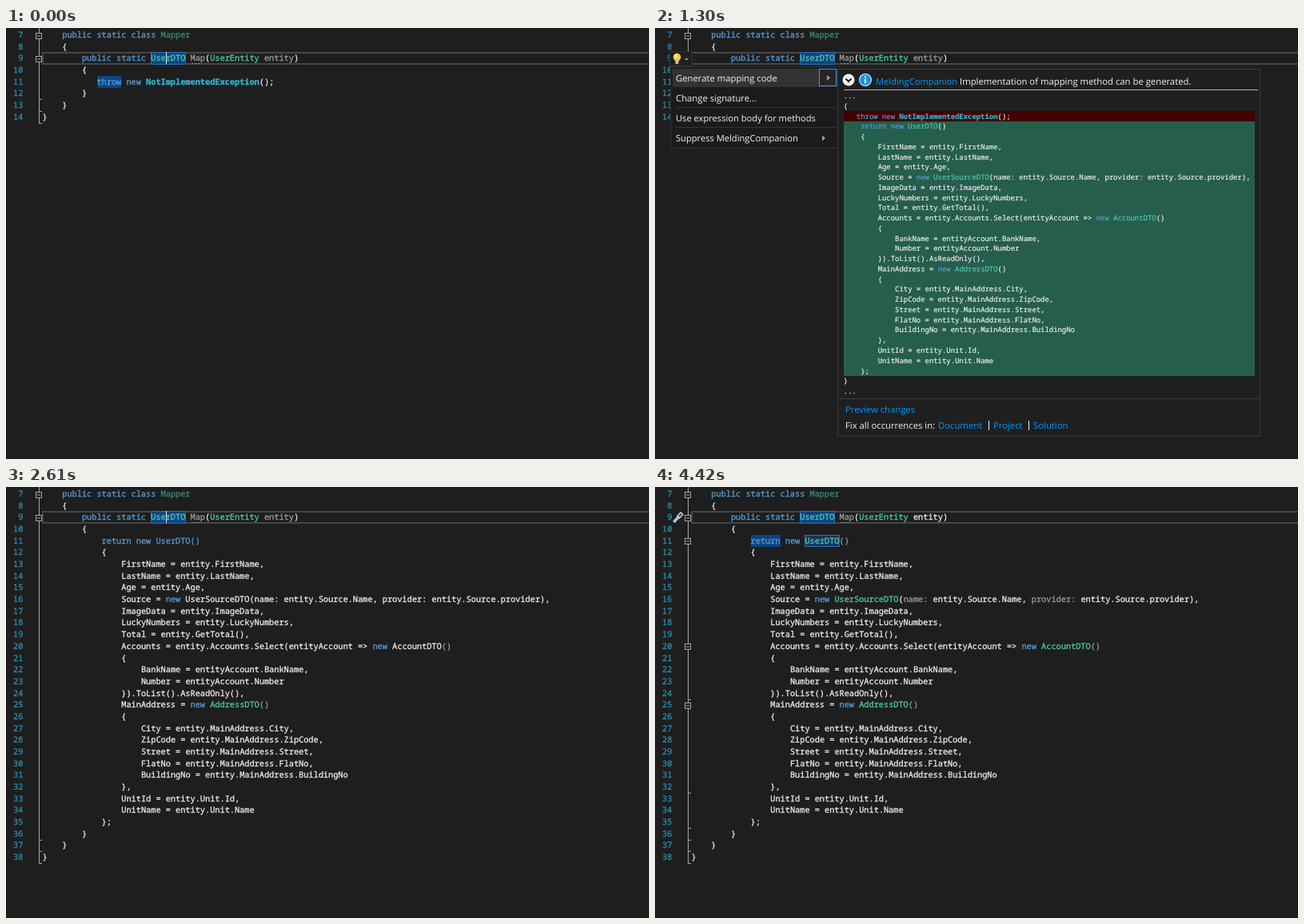
Animation of 804x540 px, one loop 4.78 s. Source, as an HTML page:

```html
<!DOCTYPE html>
<html lang="en">
<head>
<meta charset="utf-8">
<title>Mapping code</title>
<style>
html, body { margin: 0; width: 100%; height: 100%; overflow: hidden; background: #1e1e1e; }
svg { display: block; width: 804px; height: 540px; text-rendering: geometricPrecision; }
text { white-space: pre; }
text, tspan { fill: currentColor; }
.code, .code tspan { stroke: currentColor; stroke-width: .3px; }
.diff, .diff tspan { stroke: currentColor; stroke-width: .2px; }
.code { font: 10.28px "Noto Sans Mono", "DejaVu Sans Mono", monospace; }
.diff { font: 8.93px "Noto Sans Mono", "DejaVu Sans Mono", monospace; }
.ui { font: 11.3px "Open Sans", "Noto Sans", sans-serif; }
</style>
</head>
<body>
<svg id="stage" viewBox="0 0 804 540"></svg>
<script>
const LOOP = 4780;
const BG = '#1e1e1e', INK = '#ececec', BLUE = '#569cd6', TEAL = '#4ec9b0', DIM = '#9b9b9b';
const MARK = '#0e4583', EDGE = '#2f6faf', LINK = '#0097fb', FOLD = '#a5a5a5';
const TOOL = 'MeldingCompanion';

// Each step changes part of the state at its time.
const steps = [
  [0, { code: 'old', caret: 1, mark: 1, edge: 1 }],
  [70, { caret: 0, bulb: 1 }],
  [610, { bulb: 0, button: 1 }],
  [690, { menu: 1 }],
  [1300, { arrow: 1, preview: 1 }],
  [2230, { preview: 0 }],
  [2300, { menu: 0, button: 0, arrow: 0 }],
  [2610, { code: 'new', caret: 1, mark: 0 }],
  [2670, { typed: 1 }],
  [2750, { mark: 1, edge: 0 }],
  [2830, { used: 1 }],
  [3060, { account: 1 }],
  [3120, { tool: 1 }],
  [3890, { caret: 0 }],
  [4140, { folds: 1 }],
  [4190, { twin: 1, edge: 1, caret: 1 }],
  [4420, { caret: 0 }]
];

// Generated statement: indent level, then text.
const body = `0return new UserDTO()
0{
1FirstName = entity.FirstName,
1LastName = entity.LastName,
1Age = entity.Age,
1Source = new UserSourceDTO(name: entity.Source.Name, provider: entity.Source.provider),
1ImageData = entity.ImageData,
1LuckyNumbers = entity.LuckyNumbers,
1Total = entity.GetTotal(),
1Accounts = entity.Accounts.Select(entityAccount => new AccountDTO()
1{
2BankName = entityAccount.BankName,
2Number = entityAccount.Number
1}).ToList().AsReadOnly(),
1MainAddress = new AddressDTO()
1{
2City = entity.MainAddress.City,
2ZipCode = entity.MainAddress.ZipCode,
2Street = entity.MainAddress.Street,
2FlatNo = entity.MainAddress.FlatNo,
2BuildingNo = entity.MainAddress.BuildingNo
1},
1UnitId = entity.Unit.Id,
1UnitName = entity.Unit.Name
0};`.split('\n').map(l => [+l[0] * 4, l.slice(1)]);

const base = { Mapper: '#38897a', Map: DIM, UserEntity: TEAL, AddressDTO: TEAL, NotImplementedException: '#35b5d0' };
for (const k of ['public', 'static', 'class', 'new', 'return', 'throw']) base[k] = BLUE;

const tint = (text, hues) => text.replace(/\w+:?|\(\)$/g, w => hues[w]
  ? `<tspan color="${hues[w]}"${w.startsWith('NotImpl') ? ' font-weight="bold"' : ''}>${w}</tspan>` : w);
const rect = (x, y, w, h, fill, stroke = 'none', width = 1) =>
  `<rect x="${x}" y="${y}" width="${w}" height="${h}" fill="${fill}" stroke="${stroke}" stroke-width="${width}"/>`;
const path = (d, stroke, width = 1, fill = 'none') =>
  `<path d="${d}" stroke="${stroke}" stroke-width="${width}" fill="${fill}"/>`;
const disc = (x, y, r, fill) => `<circle cx="${x}" cy="${y}" r="${r}" fill="${fill}"/>`;
const label = (x, y, text, color = '#f1f1f1', size = 11.3) =>
  `<text class="ui" x="${x}" y="${y}" color="${color}" style="font-size:${size}px">${text}</text>`;
const tri = (x, y) => path(`M${x} ${y - 3.5}l4 3.5l-4 3.5z`, 'none', 0, '#a0a0a0');

const rowY = n => 12 + (n - 7) * 14.68;
const colX = c => 45.6 + c * 6.168;
const row = (n, col, text, hues) =>
  `<text class="code" x="${colX(col)}" y="${Math.round(rowY(n))}" color="${INK}">${tint(text, hues)}</text>`;
const foldBox = n => {
  const y = Math.round(rowY(n) - 6.4) + .5;
  return rect(37.5, y, 7, 7, BG, FOLD) + path(`M39 ${y + 3.5}h4`, FOLD);
};
const foldEnd = n => path(`M41 ${Math.round(rowY(n) + 4) + .5}h4`, FOLD);

function gutter(s, last) {
  let out = '';
  for (let n = 7; n <= last; n++)
    out += `<text class="code" x="21.3" y="${Math.round(rowY(n))}" color="#2b91af" text-anchor="end">${n}</text>`;
  out += path(`M41.5 0V${Math.round(rowY(last) + 5)}`, FOLD);
  const ends = [last - 2, last - 1, last], starts = [7, 9];
  if (s.folds) { ends.push(24, 32, 35); starts.push(11, 20, 25); }
  return out + ends.map(foldEnd).join('') + starts.map(foldBox).join('');
}

function editor(s) {
  const old = s.code === 'old', last = old ? 14 : 38;
  const hues = { ...base, UserDTO: TEAL, '()': DIM };
  if (s.typed) Object.assign(hues, { UserSourceDTO: TEAL, 'name:': DIM, 'provider:': DIM });
  if (s.account) hues.AccountDTO = TEAL;
  let out = rect(46, 31, 800, 14, 'none', '#464646', 2) + gutter(s, last);
  out += rect(181.5, 30.5, 43, 15, MARK, s.edge ? EDGE : MARK);
  if (s.mark) out += old ? rect(114, 60, 30, 15, MARK) : rect(120, 60, 37, 15, MARK);
  if (s.twin) out += rect(187.5, 60.5, 43, 14, '#17365e', EDGE);
  out += row(7, 4, 'public static class Mapper', hues) + row(8, 4, '{', hues);
  out += row(9, 8, 'public static UserDTO Map(UserEntity entity)', { ...hues, entity: s.used ? INK : DIM });
  out += row(10, 8, '{', hues);
  if (old) out += row(11, 11, 'throw new NotImplementedException();', hues);
  else body.forEach(([col, text], i) => {
    const raw = !i && !s.typed ? { UserDTO: BLUE, '()': BLUE } : {};
    out += row(11 + i, 12 + col, text, { ...hues, ...raw });
  });
  [8, 4, 0].forEach((col, i) => out += row(last - 2 + i, col, '}', hues));
  out += path('M232 44.5h2m2 0h2m2 0h2', DIM);
  if (s.caret) out += rect(200, 30, 1, 15, '#e8e8e8');
  return out;
}

const bulb = x => disc(x, 36.5, 4.8, '#f7c948') + disc(x - 1.2, 35, 2, '#ffe9a0') +
  rect(x - 2.5, 40, 5, 2, '#f0bd3c') + rect(x - 2, 42, 4, 3, '#b8b8b8');

const screwdriver = () => path('M23.5 44L28.5 38.5', '#7fa9cf', 4) + path('M23.5 44L34 33', '#d0d0d0', 1.4) +
  path('M28.5 38.5L34 32.5', '#d0d0d0', 5) + path('M30 37L33 33.5', '#3c3c3c', 2);

const button = () => rect(18.5, 29.5, 28, 18, '#1f1f20', '#333337') + bulb(27.5) +
  path('M37 38h5l-2.5 2.5z', 'none', 0, '#a0a0a0');

function menu(s) {
  let out = rect(19.5, 48.5, 211, 102, '#1b1b1c', '#333337') + rect(22, 51, 206, 23, '#333334');
  out += path('M26 99.5H227M26 124.5H227', '#333337');
  out += label(26, 67, 'Generate mapping code') + label(26, 92, 'Change signature...');
  out += label(26, 117, 'Use expression body for methods', '#f1f1f1', 11.15);
  out += label(26, 142, 'Suppress ' + TOOL, '#f1f1f1', 11.15) + tri(209, 138);
  if (s.arrow) out += rect(205.5, 51.5, 21, 21, '#252526', '#3399ff') + tri(215, 62.5);
  return out;
}

function preview() {
  const hues = { ...base, UserDTO: TEAL, UserSourceDTO: TEAL, AccountDTO: TEAL };
  const lines = [[0, '...'], [0, '{'], [3, 'throw new NotImplementedException();'],
    ...body.map(([c, t]) => [c + 4, t]), [0, '}'], [0, '...']];
  let out = rect(228.5, 51.5, 528, 460, '#1f1f20', '#3a3a3e');
  out += disc(242, 65, 7.5, '#f1f1f1') + path('M238.5 63.5l3.5 3.5l3.5-3.5', '#1e1e1e', 2);
  out += disc(263, 65, 8, '#f1f1f1') + disc(263, 65, 7, '#1b93dc') +
    rect(262, 60, 2, 2, '#fff') + rect(262, 63.5, 2, 6, '#fff');
  out += label(276, 71, TOOL, LINK, 11.15);
  out += label(381, 71, 'Implementation of mapping method can be generated.');
  out += path('M236 77.5H754', '#b4b4b4') + rect(236, 104, 514, 13, '#420000') + rect(236, 117, 514, 319, '#265e4d');
  lines.forEach(([col, text], i) => out +=
    `<text class="diff" x="${235.8 + col * 5.358}" y="${Math.round(88 + i * 12.76)}" color="${INK}">${tint(text, hues)}</text>`);
  out += path('M229 464.5H756', '#3a3a3e') + label(238, 482, 'Preview changes', LINK);
  out += label(238, 502, 'Fix all occurrences in:');
  out += label(354, 502, 'Document', LINK) + label(423, 502, 'Project', LINK) + label(473, 502, 'Solution', LINK);
  return out + rect(417, 492, 1, 12, '#f1f1f1') + rect(467, 492, 1, 12, '#f1f1f1');
}

function scene(s) {
  return rect(0, 0, 804, 540, BG) + rect(0, 538, 804, 2, '#1a1a1b') + editor(s) +
    (s.bulb ? bulb(29) : '') + (s.tool ? screwdriver() : '') + (s.button ? button() : '') +
    (s.menu ? menu(s) : '') + (s.preview ? preview() : '');
}

const stage = document.getElementById('stage');
const start = performance.now();
let shown = 0;
function play(now) {
  const t = Math.max(0, now - start) % LOOP;
  const count = steps.filter(([at]) => at <= t).length;
  if (count !== shown) {
    shown = count;
    stage.innerHTML = scene(Object.assign({}, ...steps.slice(0, count).map(([, change]) => change)));
  }
  requestAnimationFrame(play);
}
play(start);
</script>
</body>
</html>
```
